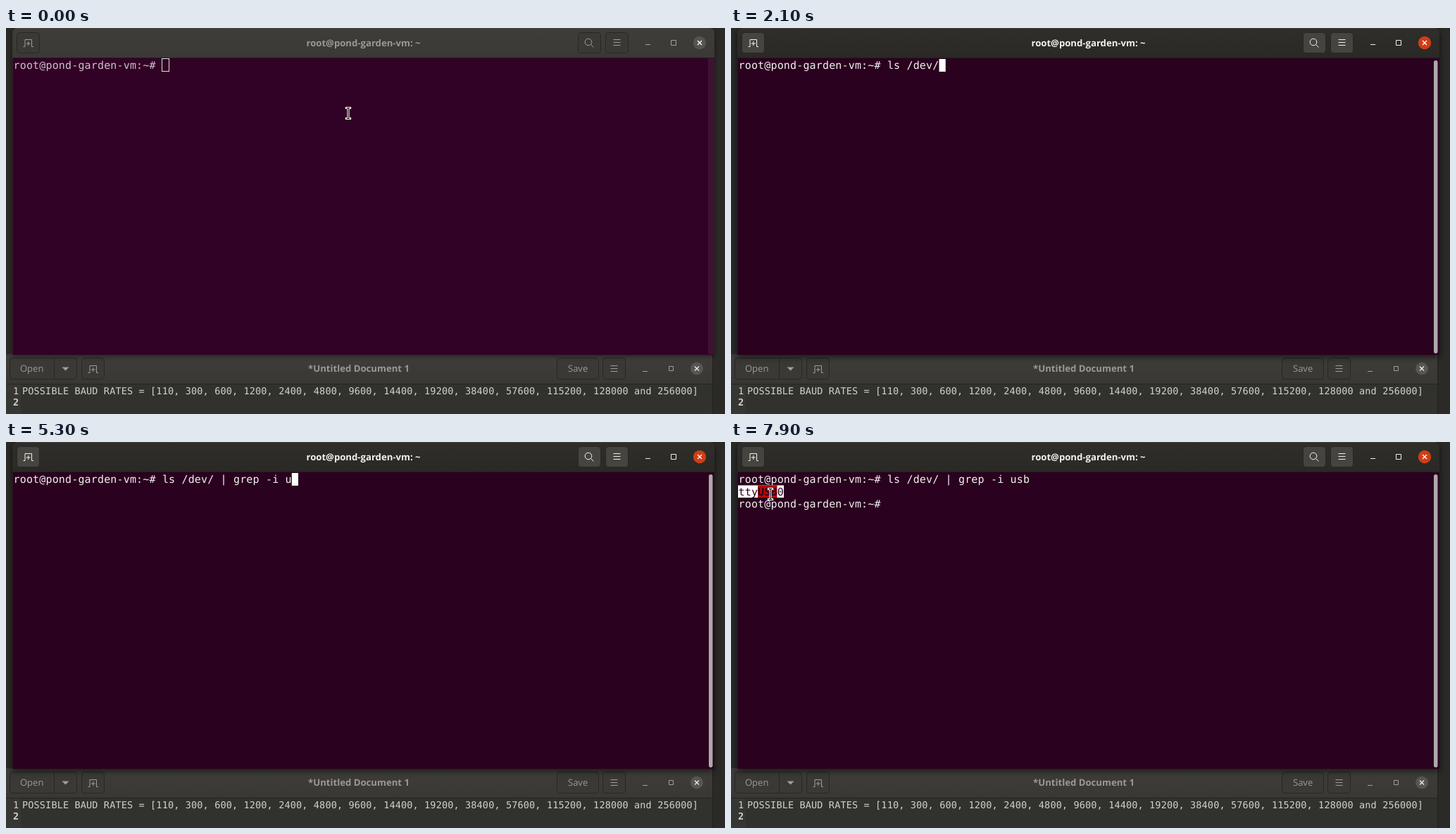
Animation, 1021 px wide and 548 px high, one loop 8 s. Source, as an HTML page:

```html
<!DOCTYPE html>
<html lang="en">
<head>
<meta charset="utf-8">
<title>Terminal session</title>
<style>
  html, body { margin: 0; width: 100%; height: 100%; overflow: hidden; background: #2b2a27; }
  svg { display: block; width: 1021px; height: 548px; }
  text { white-space: pre; text-rendering: geometricPrecision; }
  .ui { font: 13px "Open Sans", "Noto Sans", sans-serif; fill: #9b9a95; }
  .title { font: bold 13.15px "Open Sans", "Noto Sans", sans-serif; fill: #9a9994; text-anchor: middle; }
  .term { font: 15px "DejaVu Sans Mono", monospace; letter-spacing: .16px; fill: var(--text); }
  .edit { font: 13.5px "DejaVu Sans Mono", monospace; letter-spacing: .149px; fill: #d2d2cb; }
  .btn { fill: #3a3935; stroke: #282723; }
  .ico { fill: none; stroke: #a09f9a; }
  .bold { font-weight: bold; }

  #terminal { --text: #cbc2c8; --bg: #320226; --line: #a09f9a; }
  #terminal .frame { fill: url(#idle); filter: drop-shadow(0 2px 3px rgba(0,0,0,.45)); }
  #terminal .screen { fill: var(--bg); }
  #terminal .trough { fill: #3f1233; }
  #terminal .thumb { fill: none; }
  #terminal .wm { stroke: #a3a29d; }
  #terminal .close { fill: #55544f; }

  #terminal.active { --text: #f3f0f2; --bg: #2a011e; }
  #terminal.active .frame { fill: url(#focus); filter: drop-shadow(0 3px 5px rgba(0,0,0,.6)); }
  #terminal.active .title { fill: #f4f3f0; }
  #terminal.active .trough { fill: var(--bg); }
  #terminal.active .thumb { fill: #aeaaa9; }
  #terminal.active .wm { stroke: #f2f1ee; }
  #terminal.active .close { fill: #d03d16; }
</style>
</head>
<body>
<svg viewBox="0 0 1021 548">
  <defs>
    <linearGradient id="idle" x2="0" y2="1">
      <stop stop-color="#3e3d39"/><stop offset=".09" stop-color="#3a3935"/>
    </linearGradient>
    <linearGradient id="focus" x2="0" y2="1">
      <stop stop-color="#2f2e2a"/><stop offset=".09" stop-color="#2a2925"/>
    </linearGradient>
    <linearGradient id="bar" x2="0" y2="1">
      <stop stop-color="#3e3d39"/><stop offset="1" stop-color="#393834"/>
    </linearGradient>
    <path id="tab" d="M-6.5 5.5h2.5v-10h9.500v10h2.500M.75 -2v6M-2.250 1h6"/>
    <path id="menu" d="M-5 -4.500H5M-5 -.5H5M-5 3.500H5"/>
    <path id="cross" d="M-3 -3L3 3M3 -3L-3 3" stroke-width="1.500"/>
    <path id="beam" d="M-2.500 -7.500H2.500M0 -7.500V7.500M-2.500 7.500H2.500"/>
  </defs>

  <g id="editor">
    <rect y="463" width="1003" height="42" fill="url(#bar)"/>
    <rect y="505" width="1003" height="43" fill="#31322d"/>
    <rect y="506" width="21" height="42" fill="#363732"/>
    <path d="M0 505.500H1003" stroke="#252420"/>
    <path d="M1003.500 464V548" stroke="#22211f"/>
    <rect class="btn" x="5.500" y="468.500" width="95" height="30" rx="4"/>
    <path d="M68.500 469V498" stroke="#282723"/>
    <rect class="btn" x="107.500" y="468.500" width="32" height="30" rx="4"/>
    <rect class="btn" x="782.500" y="468.500" width="59" height="30" rx="4"/>
    <rect class="btn" x="847.500" y="468.500" width="32" height="30" rx="4"/>
    <text class="ui" x="20" y="488">Open</text>
    <text class="ui" x="798" y="488">Save</text>
    <path d="M79.500 481.500h10l-5 5z" fill="#a09f9a"/>
    <g class="ico">
      <use href="#tab" x="123" y="484"/>
      <use href="#menu" x="863.500" y="484"/>
      <path d="M904 487.500h7M941.500 480.500h6v6h-6z"/>
    </g>
    <circle cx="981" cy="483.500" r="9" fill="#575651"/>
    <use href="#cross" x="981" y="483.500" stroke="#e6e5e1"/>
    <text class="title" x="501" y="488">*Untitled Document 1</text>
    <text class="edit" x="10" y="520">1</text>
    <text class="edit bold" x="10" y="535.500" fill="#eee">2</text>
    <text class="edit" x="23" y="520">POSSIBLE BAUD RATES = [110, 300, 600, 1200, 2400, 4800, 9600, 14400, 19200, 38400, 57600, 115200, 128000 and 256000]</text>
  </g>

  <g id="terminal">
    <path class="frame" d="M9 464V8q0 -8 8 -8H998q8 0 8 8V464z"/>
    <path d="M14 .5H1001" stroke="#4a4944" opacity=".7"/>
    <rect class="screen" x="9.500" y="42.500" width="996" height="421.500"/>
    <path d="M9 42.500H1006" stroke="#211f1c"/>
    <rect class="trough" x="997" y="43" width="8.500" height="420"/>
    <rect class="thumb" x="998" y="46" width="5.500" height="416" rx="2.750"/>
    <g class="tool btn">
      <rect x="15.500" y="6.500" width="32" height="29" rx="4"/>
      <rect x="812.500" y="6.500" width="32" height="29" rx="4"/>
      <rect x="851.500" y="6.500" width="32" height="29" rx="4"/>
    </g>
    <g class="glyphs ico">
      <use href="#tab" x="31" y="21"/>
      <use href="#menu" x="867.500" y="21"/>
      <circle cx="827" cy="20" r="4.800"/>
      <path d="M830.500 23.500L834.500 27.500"/>
    </g>
    <path class="wm" fill="none" d="M908 23.500h7M944.500 17.500h7v7h-7z"/>
    <circle class="close" cx="985" cy="21" r="9.200"/>
    <use href="#cross" x="985" y="21" stroke="#f5f4f1"/>
    <text class="title" x="507.500" y="25.500">root@pond-garden-vm: ~</text>

    <text class="term" x="10.500" y="58">root@pond-garden-vm:~# <tspan id="cmd"></tspan></text>
    <g id="output">
      <g id="marked">
        <rect x="10" y="61.500" width="65" height="17.500" fill="#fff"/>
        <rect x="38" y="61.500" width="27.500" height="17.500" fill="#b30a06"/>
      </g>
      <text id="device" class="term" x="10.500" y="75.500">tty<tspan id="match" class="bold">USB</tspan>0</text>
      <text class="term" x="10.500" y="93">root@pond-garden-vm:~#</text>
    </g>
    <rect id="caret" width="9.200" height="18"/>
  </g>

  <g id="mouse" fill="none">
    <use href="#beam" stroke="#fff" stroke-width="3.200" stroke-linecap="square"/>
    <use href="#beam" stroke="#15020f" stroke-width="1.200"/>
  </g>
</svg>
<script>
const $ = s => document.querySelector(s);
const LOOP = 8000, CELL = 9.19, COMMAND = "ls /dev/ | grep -i usb";

// [time, number of typed characters]
const KEYS = [
  [1400, 1], [1500, 2], [1700, 4], [1800, 5], [2100, 8], [2800, 9], [3300, 10],
  [3500, 11], [3700, 12], [3900, 14], [4100, 15], [4200, 16], [4800, 17],
  [5100, 18], [5200, 19], [5300, 20], [5400, 21], [5500, 22]
];
const BLINKS = [[900, 1400], [2700, 2800], [6400, 7000], [7600, 8000]];

const terminal = $("#terminal"), caret = $("#caret"), mouse = $("#mouse");
const show = (el, on) => el.setAttribute("visibility", on ? "visible" : "hidden");
const mix = (a, b, k) => `rgb(${a.map((v, i) => Math.round(v + (b[i] - v) * k))})`;
const bezier = (a, b, c, k) => a * (1 - k) ** 2 + 2 * b * k * (1 - k) + c * k * k;

function drawCaret(t, typed, done) {
  const active = t >= 400;
  const x = 222 + (done ? 0 : typed * CELL), y = done ? 79 : 44;
  caret.setAttribute("x", active ? x : x - .5);
  caret.setAttribute("y", active ? y : y - .5);
  caret.setAttribute("width", active ? 9.2 : 10);
  caret.style.fill = active ? "#fff" : "none";
  caret.style.stroke = active ? "none" : "#e4dfe2";
  show(caret, !BLINKS.some(([from, to]) => t >= from && t < to));
}

function drawMouse(t) {
  let x = 486, y = 121;
  if (t >= 1400) {
    const k = Math.min(1, Math.max(0, (t - 6900) / 800));
    const e = k * k * (3 - 2 * k);
    x = bezier(496, 230, 56, e);
    y = bezier(120, -16, 74, e);
  }
  mouse.setAttribute("transform", `translate(${x.toFixed(1)} ${y.toFixed(1)})`);
  show(mouse, t < 1500 || t >= 6900);
}

function draw(now) {
  // the screen was refreshed ten times a second
  const t = Math.floor((now % LOOP) / 100) * 100;
  const typed = KEYS.reduce((n, [at, count]) => t >= at ? count : n, 0);
  const done = t >= 5800, marked = t >= 7900;
  const fade = Math.min(1, Math.max(0, (t - 400) / 300));
  const glow = 1 - (1 - fade) ** 2;

  terminal.classList.toggle("active", t >= 400);
  $(".tool").style.fill = mix([58, 57, 53], [69, 68, 63], glow);
  $(".glyphs").style.stroke = mix([160, 159, 154], [244, 243, 240], glow);

  $("#cmd").textContent = COMMAND.slice(0, typed);
  $("#output").style.display = done ? "" : "none";
  $("#marked").style.display = marked ? "" : "none";
  $("#device").style.fill = marked ? "#2a011e" : "";
  $("#match").style.fill = marked ? "#2a011e" : "#b30a06";

  drawCaret(t, typed, done);
  drawMouse(t);
}

let start;
function tick(now) {
  start ??= now;
  draw(now - start);
  requestAnimationFrame(tick);
}
draw(0);
requestAnimationFrame(tick);
</script>
</body>
</html>
```
